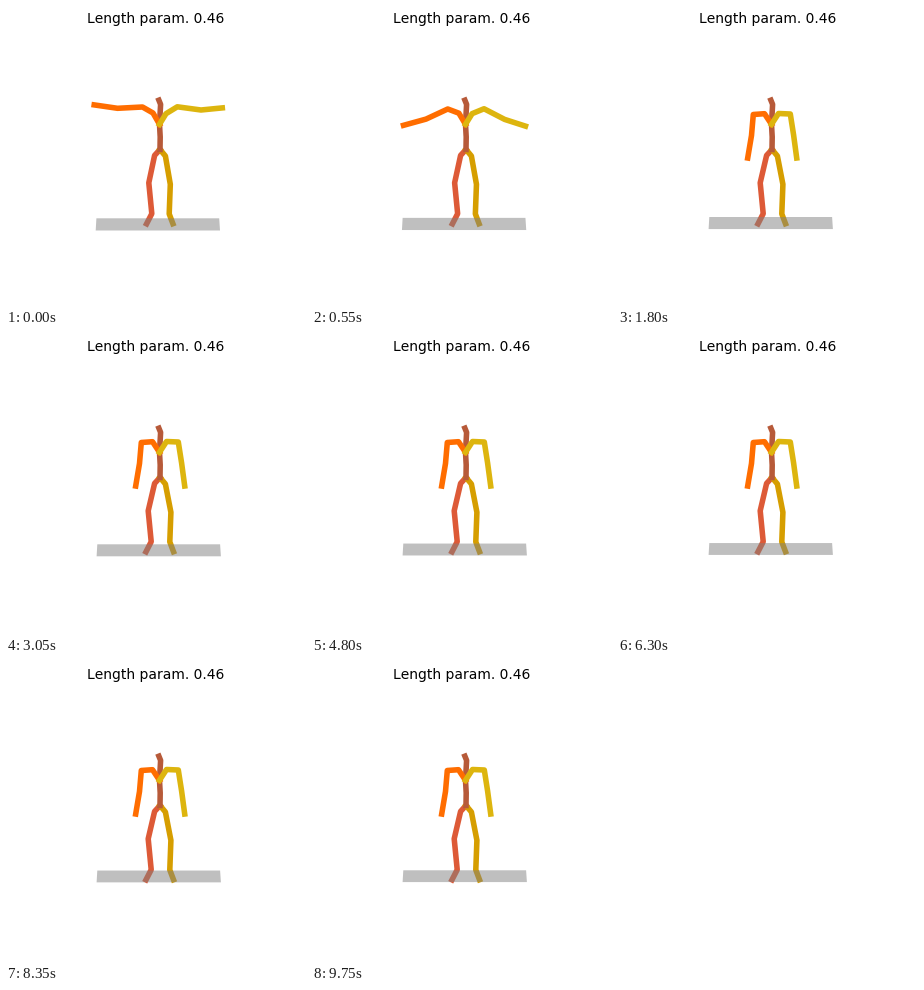
These frames come from a looping animation (300 px wide and 300 px high, 9800 ms). A matplotlib script:

```python
import math

import matplotlib.pyplot as plt
import numpy as np
from matplotlib.animation import FuncAnimation
from matplotlib.patches import Polygon

SIZE = 300
FRAMES, STEP = 196, 50
DROP = 1.62   # seconds the arms take to come down
SETTLE = 6.0  # time constant of the floor's drift

HIPS, CHEST = (154, 143.5), (153.5, 118.3)
SPINE = [HIPS, (154.2, 131), CHEST, (154.6, 98.4), (152.9, 94.2)]
RIGHT_LEG = [HIPS, (148.6, 149.4), (142.8, 176.8), (145.8, 207.7), (140.6, 217.8)]
LEFT_LEG = [HIPS, (159.4, 150), (164.3, 178.3), (163.2, 207.9), (166.9, 217.7)]

# Each arm is raised first, then hangs down
RIGHT_ARM = ([CHEST, (147, 107), (136.5, 101), (111.5, 102.3), (88.2, 98.9)],
             [CHEST, (146.5, 107.7), (135.3, 108.5), (133.5, 129.5), (129.7, 152)])
LEFT_ARM = ([CHEST, (160, 107.7), (171.3, 100.8), (195, 104), (216.3, 101.9)],
            [CHEST, (160.5, 107.5), (172.3, 108), (175.6, 129), (178.7, 152)])


def ease(u):
    u = min(max(u, 0), 1)
    return u * u * (3 - 2 * u)


def swing(arm, p):
    """Turn each bone from its raised to its hanging direction."""
    bones = np.diff(np.array(arm, float), axis=1)
    angles = np.unwrap(np.arctan2(bones[..., 1], bones[..., 0]), axis=0)
    lengths = np.hypot(bones[..., 0], bones[..., 1])
    a = angles[0] + p * (angles[1] - angles[0])
    r = lengths[0] + p * (lengths[1] - lengths[0])
    steps = np.column_stack([r * np.cos(a), r * np.sin(a)])
    return np.vstack([CHEST, CHEST + np.cumsum(steps, axis=0)])


def spread(leg, dx):
    """Shift a leg sideways from the knee down."""
    points = np.array(leg, float)
    points[2:, 0] += dx
    return points


plt.rcParams["text.kerning_factor"] = 6
fig = plt.figure(figsize=(3, 3), dpi=100, facecolor="white")
fig.suptitle("Length param. 0.46", fontsize=10)
ax = fig.add_axes([0, 0, 1, 1])
ax.set_xlim(0, SIZE)
ax.set_ylim(SIZE, 0)
ax.axis("off")

# Right leg, left leg, spine, right arm, left arm
COLORS = ["#DD5A37", "#D69E00", "#B75A39", "#FF6D00", "#DDB50E"]
lines = [
    ax.plot([], [], color=color, lw=4, solid_capstyle="projecting",
            solid_joinstyle="round")[0]
    for color in COLORS
]
floor = Polygon(np.zeros((4, 2)), facecolor=(0.5, 0.5, 0.5, 0.5), lw=0, zorder=5)
ax.add_patch(floor)


def draw(frame):
    t = frame * STEP / 1000
    p = ease(t / DROP)
    limbs = [spread(RIGHT_LEG, -0.6 * p), spread(LEFT_LEG, 0.6 * p),
             np.array(SPINE), swing(RIGHT_ARM, p), swing(LEFT_ARM, p)]
    for line, points in zip(lines, limbs):
        line.set_data(*points.T)

    drift = math.exp(-t / SETTLE)
    top = 207.3 + 5 * drift
    bottom = top + 11.7 + 0.5 * drift
    left = 90.4 + 0.9 * p
    floor.set_xy([(left, top), (left + 122.8, top),
                  (left + 123.6, bottom), (left - 0.7, bottom)])
    return [*lines, floor]


anim = FuncAnimation(fig, draw, frames=FRAMES, interval=STEP,
                     repeat=True, repeat_delay=0)
plt.show()
```
